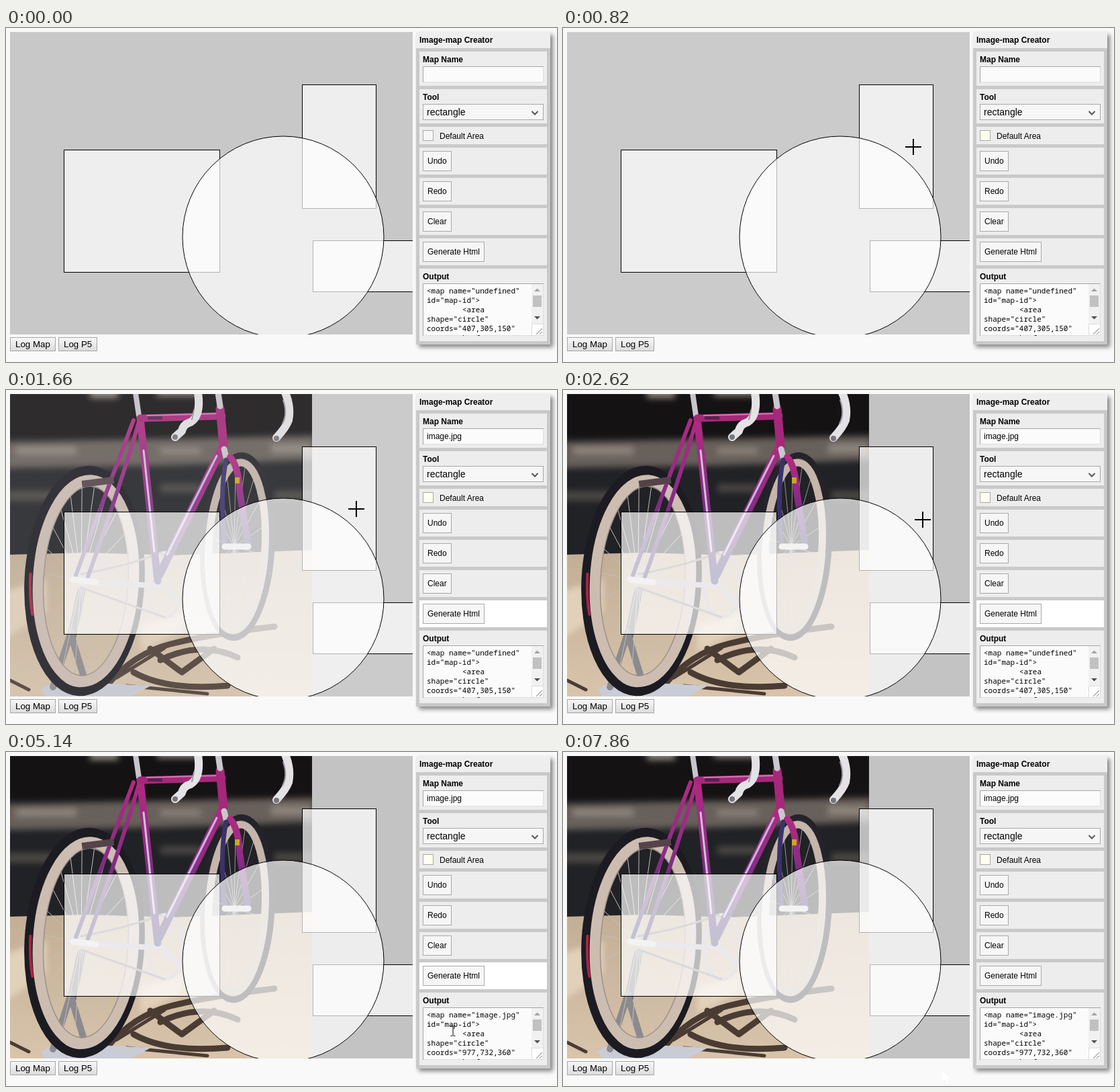
Animation of 821x497 px, one loop 8 s. Source, as an HTML page:

```html
<!DOCTYPE html>
<html lang="en">
<head>
<meta charset="utf-8">
<title>Image-map Creator</title>
<style>
html, body { margin: 0; width: 100%; height: 100%; overflow: hidden; background: #f9f9f9; }
svg { display: block; }
text { font: 12px "Liberation Sans", Arial, sans-serif; fill: #000; white-space: pre; }
.bold { font-weight: bold; }
.big { font-size: 14px; }
.log text { font-size: 13.333px; }
.mono text { font: 11px "Noto Sans Mono", "DejaVu Sans Mono", monospace; }
.item rect { fill: #ededed; }
.box rect { fill: #f6f6f6; stroke: #a9a9a9; }
.field { fill: #fbfbfb; stroke: #dedede; }
.inset { fill: none; stroke: #a6a6a6; }
.shapes { fill: #fff; fill-opacity: .7; stroke: #000; }
.line { fill: none; stroke-linecap: round; stroke-linejoin: round; }
.blur { filter: blur(5px); }
</style>
</head>
<body>
<svg width="821" height="497" viewBox="0 0 821 497">
<defs>
  <linearGradient id="face" x2="0" y2="1"><stop stop-color="#f7f7f7"/><stop offset="1" stop-color="#dcdcdc"/></linearGradient>
  <linearGradient id="sand" x2="0" y2="1"><stop stop-color="#c2ae95"/><stop offset="1" stop-color="#d8c4ab"/></linearGradient>
  <linearGradient id="paint" x2="0" y2="1"><stop stop-color="#b02a80"/><stop offset=".45" stop-color="#8c2c86"/><stop offset="1" stop-color="#35306e"/></linearGradient>
  <clipPath id="canvasClip"><rect x="6" y="6" width="600" height="450"/></clipPath>
  <clipPath id="photoClip"><rect x="6" y="6" width="450" height="450"/></clipPath>
  <clipPath id="circleClip"><circle cx="413" cy="311" r="149.5"/></clipPath>
  <clipPath id="outClip"><rect x="622" y="381" width="161" height="77"/></clipPath>
  <g id="rects">
    <rect x="86.5" y="181.5" width="232" height="182"/>
    <rect x="441.5" y="84.5" width="110" height="184"/>
    <rect x="457.5" y="316.5" width="160" height="76"/>
  </g>
  <path id="arrow" d="M.5 .5V16.5L4.2 13L6.8 18.8L9.2 17.7L6.7 12H11.8Z"/>

  <g id="photo" clip-path="url(#photoClip)">
    <path fill="#212226" d="M6 6H456V456H6Z"/>
    <g class="blur">
      <path fill="#151214" d="M0 0H460V72H0Z"/>
      <path fill="#68605a" d="M0 78L460 68V104L240 112L0 116Z"/>
      <path fill="#8d857c" d="M125 0h42v12h-42ZM225 0h60v9h-60ZM15 84h90v12H15ZM230 86h60v9h-60ZM395 80h60v14h-60Z"/>
      <path fill="#4a4743" d="M0 150H90V165H0ZM230 140H290V152H230ZM400 150H460V164H400Z"/>
    </g>
    <path fill="url(#sand)" d="M6 245L120 242L250 246L456 238V456H6Z"/>
    <path class="blur" fill="#e2d1ba" d="M0 300L60 280V330L0 370ZM200 350L270 330L260 360L200 390Z"/>
    <g class="line" stroke="#4a3b33" stroke-width="9">
      <path d="M150 440Q190 392 245 378T400 352M190 420Q240 448 330 440M215 385L262 420L310 385M230 402Q290 372 345 398"/>
      <path stroke-width="5" d="M165 428L236 384M180 440L300 452M6 432L34 446"/>
    </g>
    <path fill="#c9ccd6" d="M52 446L72 433L216 440L186 456H58Z"/>
    <path class="line" stroke="#77767a" stroke-width="13" d="M112 300L97 372"/>
    <path class="line" stroke="#8b8a8d" stroke-width="10" d="M97 360L70 442M97 365L120 440"/>

    <g class="line">
      <path id="frontSpokes" stroke="#b9aeb0" stroke-width=".8"/>
      <g transform="rotate(3 345 233)">
        <ellipse cx="345" cy="233" rx="51" ry="136" stroke="#24232a" stroke-width="9"/>
        <ellipse cx="344" cy="233" rx="42" ry="125" stroke="#c5b5aa" stroke-width="11"/>
      </g>
      <path id="rearSpokes" stroke="#c5bdbb" stroke-width="1"/>
      <g transform="rotate(3 117 284)">
        <ellipse cx="117" cy="284" rx="83" ry="165" stroke="#1c1b22" stroke-width="13"/>
        <ellipse cx="119" cy="284" rx="71" ry="150" stroke="#cdbdb1" stroke-width="16"/>
        <ellipse cx="119" cy="284" rx="63" ry="141" stroke="#9d9089" stroke-width="1.5"/>
        <path stroke="#a92545" stroke-width="4" d="M36 278Q36 312 42 338"/>
      </g>
      <ellipse cx="237" cy="290" rx="27" ry="48" stroke="#b9b2b8" stroke-width="5"/>
      <path stroke="#8a8288" stroke-width="3" d="M112 274Q180 262 232 242M112 294L236 338"/>
      <path stroke="#bdb5c2" stroke-width="8" d="M110 284L232 292"/>
      <path stroke="url(#paint)" stroke-width="6" d="M190 45Q150 150 104 276M198 48Q168 150 122 278"/>
      <path stroke="#c8c4cc" stroke-width="8" d="M193 4L198 38"/>
      <path stroke="url(#paint)" stroke-width="11" d="M200 42L226 284"/>
      <path stroke="#d3bfd8" stroke-width="3" d="M205 90L221 240"/>
      <path stroke="url(#paint)" stroke-width="12" d="M324 82L228 276"/>
      <path stroke="#c6b8df" stroke-width="3" d="M314 98L240 245"/>
      <path stroke="#a5287a" stroke-width="11" d="M201 42L322 38.5"/>
      <path stroke="#d27ab4" stroke-width="2" d="M210 38L318 35"/>
      <path stroke="#a5287a" stroke-width="13" d="M319 28L324 82"/>
      <path stroke="#c9c7cc" stroke-width="9" d="M316 4L319 24M325 88L328 100"/>
      <path stroke="url(#paint)" stroke-width="10" d="M334 100Q346 112 348 150L361 233"/>
      <path stroke="#3a3269" stroke-width="7" d="M328 104Q318 150 326 232"/>
      <path stroke="#d9d6da" stroke-width="9" d="M100 282L134 286M326 233L361 233"/>
      <path stroke="#bbb6bb" stroke-width="9" d="M232 292L262 320"/>
      <path stroke="#e3e2e5" stroke-width="12" d="M286 4Q291 38 275 48Q264 51 262 61L252 70M416 4Q425 25 421 45Q417 56 403 71"/>
      <path stroke="#9a999f" stroke-width="2" d="M280 30L277 44M413 15Q420 35 412 50"/>
    </g>
    <circle cx="252" cy="70" r="4" fill="#77767c"/><circle cx="403" cy="72" r="4" fill="#77767c"/>
    <rect x="113" y="132" width="48" height="10" fill="#55434a" transform="rotate(-7 137 137)"/>
    <rect x="211" y="39" width="22" height="5" fill="#57234e"/>
    <rect x="341" y="130" width="7" height="9" fill="#c9a91e"/>
  </g>
</defs>

<g clip-path="url(#canvasClip)">
  <rect id="back" x="6" y="6" width="600" height="450"/>
  <use id="picture" href="#photo"/>
  <g class="shapes">
    <use href="#rects"/>
    <circle cx="413" cy="311" r="150"/>
  </g>
  <g id="tint" clip-path="url(#circleClip)" fill="#fffff0" stroke="#b2b2b2"><use href="#rects"/></g>
</g>

<g class="log" stroke="#a6a6a6" fill="url(#face)">
  <rect x="6.5" y="460.5" width="67" height="20"/><rect x="78.5" y="460.5" width="57" height="20"/>
  <g stroke="none"><text x="14" y="475">Log Map</text><text x="86" y="475">Log P5</text></g>
</g>

<rect x="611" y="6" width="200" height="465" fill="#c9c9c9" style="filter:drop-shadow(4px 4px 3px #0007)"/>
<rect x="611" y="6" width="200" height="24" fill="#eee"/>
<text class="bold" x="616" y="22">Image-map Creator</text>
<g class="item">
  <rect x="616" y="35" width="190" height="51"/>
  <rect x="616" y="91" width="190" height="51"/>
  <rect x="616" y="147" width="190" height="26"/>
  <rect x="616" y="178" width="190" height="40"/>
  <rect x="616" y="223" width="190" height="40"/>
  <rect x="616" y="268" width="190" height="40"/>
  <rect id="genItem" x="616" y="313" width="190" height="40"/>
  <rect x="616" y="358" width="190" height="108"/>
</g>
<text class="bold" x="621" y="51">Map Name</text>
<rect class="field" x="621.5" y="57.5" width="179" height="23"/>
<path class="inset" d="M621.5 81V57.5H801"/>
<text id="mapName" x="627" y="73"></text>
<text class="bold" x="621" y="107">Tool</text>
<g class="box">
  <rect x="621.5" y="113.5" width="179" height="23"/>
  <rect id="check" x="621.5" y="152.5" width="15" height="15"/>
  <rect x="621.5" y="183.5" width="42" height="29"/>
  <rect x="621.5" y="228.5" width="42" height="29"/>
  <rect x="621.5" y="273.5" width="42" height="29"/>
  <rect x="621.5" y="318.5" width="91" height="29"/>
</g>
<text class="big" x="627" y="130">rectangle</text>
<path d="M783.5 124L788 128.5L792.5 124" fill="none" stroke="#555" stroke-width="2"/>
<text x="646" y="165">Default Area</text>
<text x="628" y="202">Undo</text>
<text x="628" y="247">Redo</text>
<text x="628" y="292">Clear</text>
<text x="628" y="337">Generate Html</text>
<text class="bold" x="621" y="374">Output</text>
<rect class="field" x="621.5" y="380.5" width="179" height="77"/>
<path class="inset" d="M621.5 458V380.5H801"/>
<g class="mono" clip-path="url(#outClip)">
  <text id="line1" x="627" y="395"></text>
  <text x="627" y="409">id="map-id"&gt;</text>
  <text x="680" y="423">&lt;area</text>
  <text x="627" y="437">shape="circle"</text>
  <text id="line5" x="627" y="451"></text>
  <text x="680" y="465">href</text>
</g>
<path fill="#f1f1f1" d="M783 381H800V440H783Z"/>
<path fill="#c1c1c1" d="M785 398H798V415H785Z"/>
<path fill="#a3a3a3" d="M787 392L791.500 387.500L796 392Z"/>
<path fill="#505050" d="M787 429H796L791.500 433.500Z"/>
<path fill="#fff" stroke="#dcdcdc" d="M783.500 440.500H800.500V457.500H783.500Z"/>
<path stroke="#777" d="M790 456L799 447M795 456L799 452"/>

<g id="pointer">
  <g id="drag">
    <rect x="-33" y="-82" width="103" height="103" fill="#d5e8f2" fill-opacity=".65" stroke="#b5d0de" stroke-opacity=".6" style="filter:drop-shadow(1px 2px 2px #0005)"/>
    <use href="#photo" opacity=".8" transform="translate(-29.200 -78.200) scale(.202)"/>
    <rect x="29.5" y="23.500" width="107" height="19" fill="#fff" stroke="#777"/>
    <path d="M33 33H44M39.500 28.500L44 33L39.500 37.500" fill="none" stroke="#2337b4" stroke-width="1.300"/>
    <text x="49" y="37" style="font:11.5px 'Open Sans','Noto Sans',sans-serif;fill:#2337b4">le déplacement</text>
  </g>
  <path id="cross" d="M-12 0H12M0 -12V12" stroke="#000" stroke-width="2"/>
  <path id="beam" d="M-3.500 -7.500H-1L0 -6.500L1 -7.500H3.500M0 -6.500V6.500M-3.500 7.500H-1L0 6.500L1 7.500H3.500" fill="none" stroke="#000"/>
  <use id="tip" href="#arrow" fill="#fff"/>
</g>
</svg>

<script>
const LOOP = 8000;
const $ = id => document.getElementById(id);
const show = (id, on) => $(id).style.display = on ? '' : 'none';

// time, x, y of the pointer's hot spot
const path = [
  [500, 790, 94], [580, 660, 152], [660, 565, 192], [740, 532, 183], [820, 522, 177],
  [2500, 522, 177], [3100, 658, 329], [4620, 658, 329], [5180, 666, 416], [5380, 666, 416],
  [5420, 667, 416], [5820, 667, 416], [6260, 697, 392], [6980, 697, 392], [7060, 565, 474]
];

function spokes(id, cx, cy, rx, ry, n) {
  let d = '';
  for (let i = 0; i < n; i++) {
    const a = (i + .3) / n * 2 * Math.PI;
    d += `M${cx - 5} ${cy}L${cx + rx * Math.cos(a)} ${cy + ry * Math.sin(a)}`;
  }
  $(id).setAttribute('d', d);
}

function pointerAt(t) {
  const i = path.findIndex(k => k[0] > t);
  if (i < 1) return (i ? path[path.length - 1] : path[0]).slice(1);
  const [t0, x0, y0] = path[i - 1], [t1, x1, y1] = path[i];
  let p = (t - t0) / (t1 - t0);
  if (t > 2000) p *= p * (3 - 2 * p);
  return [Math.round(x0 + (x1 - x0) * p), Math.round(y0 + (y1 - y0) * p)];
}

function grayAt(t) {
  if (t < 580) return 200;
  if (t < 1380) return 203;
  if (t < 1620) return Math.min(218, 208 + (t - 1380) / 12);
  return t < 1660 ? 210 : t < 1700 ? 203 : 195;
}

function draw(time) {
  const t = Math.floor((time - 20) / 40) * 40 + 20;
  const loaded = t >= 1380, made = t >= 4060;
  const g = grayAt(t);
  $('back').setAttribute('fill', `rgb(${g},${g},${g})`);
  $('picture').setAttribute('opacity', t < 1620 ? 0 : t < 1660 ? .5 : t < 1700 ? .86 : 1);
  show('tint', loaded && t < 1620);
  $('genItem').style.fill = loaded && t < 7860 ? '#fff' : '';
  $('check').style.fill = t >= 820 ? '#fffff0' : '';
  $('mapName').textContent = loaded ? 'image.jpg' : '';
  $('line1').textContent = `<map name="${made ? 'image.jpg' : 'undefined'}"`;
  $('line5').textContent = `coords="${made ? '977,732,360' : '407,305,150'}"`;

  const [x, y] = pointerAt(t);
  const dragging = t < 820;
  const cross = !dragging && x < 606 && y < 456;
  const beam = x > 621 && x < 783 && y > 380 && y < 458;
  $('pointer').setAttribute('transform', `translate(${x} ${y})`);
  show('pointer', t >= 500);
  show('drag', dragging);
  show('cross', cross);
  show('beam', beam);
  show('tip', !cross && !beam);
  $('tip').setAttribute('stroke', t < 7100 ? '#000' : 'none');
}

function tick() {
  draw(performance.now() % LOOP);
  requestAnimationFrame(tick);
}

spokes('rearSpokes', 117, 284, 66, 146, 22);
spokes('frontSpokes', 345, 233, 40, 122, 18);
tick();
</script>
</body>
</html>
```
